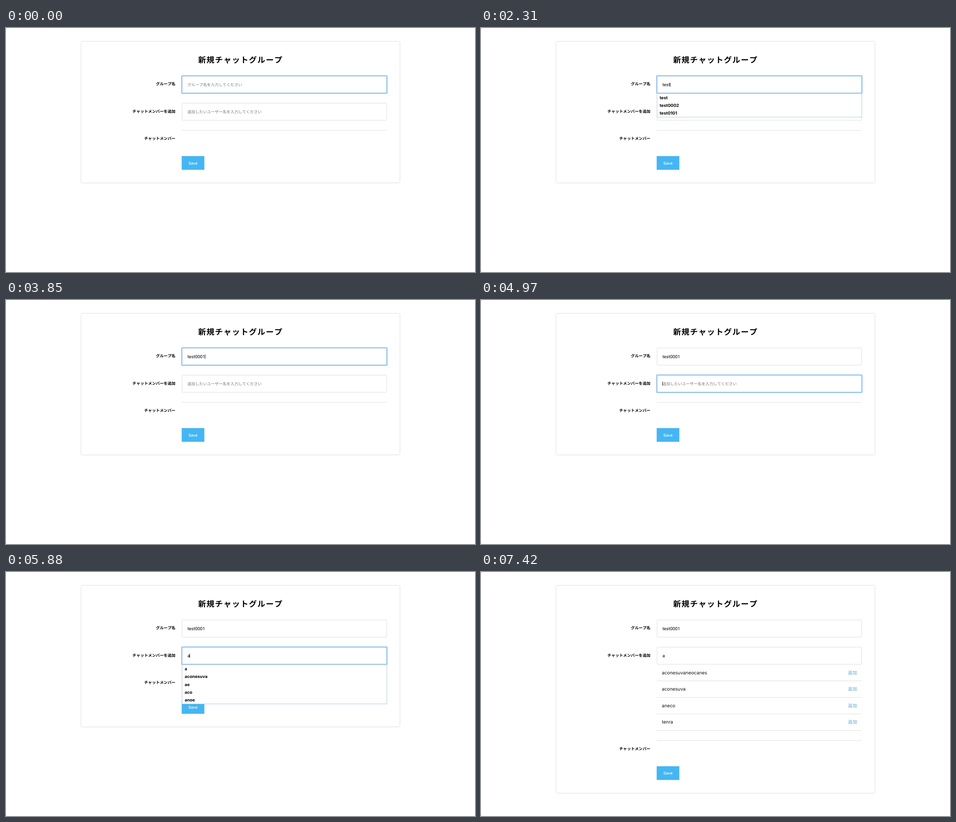
An HTML page that plays this animation: 1035 by 541 pixels, repeating every 8000 ms.

```html
<!DOCTYPE html>
<html lang="ja">
<head>
<meta charset="utf-8">
<title>新規チャットグループ</title>
<style>
  html, body { margin: 0; width: 100%; height: 100%; overflow: hidden; background: #fff; }
  svg { display: block; }
  text {
    font: 8.64px "Noto Sans CJK JP", "Noto Sans CJK", sans-serif;
    font-kerning: none;
    text-rendering: geometricPrecision;
    fill: #000;
  }
  .title { font-size: 17.28px; font-weight: 700; letter-spacing: 1.44px; }
  .label { font-weight: 700; text-anchor: end; }
  .hint { fill: #757575; }
  .typed { font: 9.9px Roboto, sans-serif; }
  .option { font: 700 9.45px Inter, sans-serif; }
  .user { font: 10.25px Inter, sans-serif; fill: #111; }
  .add { font-size: 10.08px; fill: #5fa5cb; }
  .save { font: 500 8.64px Inter, sans-serif; fill: #fff; }
  .box { fill: #fff; stroke: #dedede; }
  .rule { stroke: #dedede; }
  .glow { fill: none; stroke: #7dbcf2; stroke-opacity: .3; stroke-width: 3.6; }
  .ring { fill: none; stroke: #8abdec; stroke-width: 1.7; }
  .menu { fill: #fff; stroke: #b4cbd2; }
</style>
</head>
<body>
<svg id="stage" width="1035" height="541" viewBox="0 0 1035 541"></svg>
<script>
const LOOP = 8000;
const LEFT = 388, RIGHT = 840.5, TEXT_LEFT = 400.4;
const ROW = 17.28, LIST_ROW = 36.65, LIST_HEIGHT = 146.7;
const FIELD_TOPS = [106, 166.3];

const groups = ['test', 'test0002', 'test0101'];
const memberOptions = ['a', 'aconesuva', 'ae', 'aco', 'anoe'];
const users = ['aconesuvaneocanes', 'aconesuva', 'aneco', 'tenra'];

// Each step overrides part of the state from its time on.
const steps = [
  [0, { group: '', member: '', focus: 0, caret: false, options: [], open: false }],
  [70, { group: 't', caret: true, options: groups }],
  [140, { group: 'te' }],
  [630, { group: 'tes' }],
  [910, { group: 'test' }],
  [1470, { caret: false }],
  [1960, { caret: true }],
  [2520, { group: 'test0', options: groups.slice(1) }],
  [3080, { caret: false }],
  [3150, { group: 'test00', caret: true, options: groups.slice(1, 2) }],
  [3500, { group: 'test000' }],
  [3850, { group: 'test0001', options: [] }],
  [4410, { caret: false }],
  [4970, { focus: 1, caret: true }],
  [5530, { caret: false }],
  [5880, { member: 'a', caret: true, options: memberOptions }],
  [6020, { open: true }],
  [6370, { caret: false }],
  [6510, { focus: -1, options: [] }]
];

const stage = document.getElementById('stage');

function add(parent, tag, attrs, content = '') {
  const node = document.createElementNS('http://www.w3.org/2000/svg', tag);
  for (const key in attrs) node.setAttribute(key, attrs[key]);
  node.textContent = content;
  return parent.appendChild(node);
}
const rect = (parent, cls, x, y, width, height, rx = 0) =>
  add(parent, 'rect', { class: cls, x, y, width, height, rx });
const text = (parent, cls, x, y, content = '') =>
  add(parent, 'text', { class: cls, x, y }, content);
const rule = (parent, y) =>
  add(parent, 'line', { class: 'rule', x1: LEFT, x2: RIGHT, y1: y, y2: y });
const show = (node, on) => node.setAttribute('visibility', on ? 'visible' : 'hidden');

const card = rect(stage, 'box', 165.5, 29.5, 704, 314, 3);
text(stage, 'title', 423.9, 77.4, '新規チャットグループ');
text(stage, 'label', 374, 127.4, 'グループ名');
text(stage, 'label', 374, 187.6, 'チャットメンバーを追加');

const hints = ['グループ名を入力してください', '追加したいユーザー名を入力してください'];
const fields = FIELD_TOPS.map((top, i) => {
  rect(stage, 'box', 388.5, Math.floor(top) + .5, 451.5, 38, 1);
  const focus = add(stage, 'g', {});
  rect(focus, 'glow', 388, top, 452.7, 38.6, 1);
  rect(focus, 'ring', 388, top, 452.7, 38.6, 1);
  return {
    focus,
    hint: text(stage, 'hint', TEXT_LEFT, top + 22.8, hints[i]),
    typed: text(stage, 'typed', TEXT_LEFT, top + 22.9)
  };
});
const caret = add(stage, 'rect', { width: 1, height: 9, fill: '#222' });

const results = add(stage, 'g', {});
users.forEach((name, i) => {
  const y = 226.5 + i * LIST_ROW;
  text(results, 'user', 398.9, y, name);
  text(results, 'add', 809.8, y, '追加');
  rule(results, 241.5 + i * LIST_ROW);
});

const footer = add(stage, 'g', {});
rule(footer, 227);
text(footer, 'label', 374, 248, 'チャットメンバー');
add(footer, 'rect', { x: 387.7, y: 284, width: 50, height: 30.4, fill: '#44b6f3' });
text(footer, 'save', 402.5, 302.7, 'Save');

const menu = add(stage, 'g', {});

// Corners of the recorded window
for (const y of [0, 540]) add(stage, 'rect', { y, width: 1, height: 1, fill: '#777' });

function drawMenu({ focus, options }) {
  menu.replaceChildren();
  if (!options.length) return;
  const top = FIELD_TOPS[focus] + 39.3;
  rect(menu, 'menu', 388.5, top, 452, options.length * ROW + .5);
  options.forEach((name, i) => text(menu, 'option', 394.2, top + 12.5 + i * ROW, name));
}

function draw(state) {
  fields.forEach((field, i) => {
    const value = i ? state.member : state.group;
    field.typed.textContent = value;
    show(field.hint, !value);
    show(field.focus, state.focus === i);
  });
  show(caret, state.caret);
  if (state.caret) {
    const width = fields[state.focus].typed.getComputedTextLength();
    caret.setAttribute('x', Math.floor(TEXT_LEFT + width));
    caret.setAttribute('y', Math.round(FIELD_TOPS[state.focus] + 15));
  }
  const shift = state.open ? LIST_HEIGHT : 0;
  show(results, state.open);
  card.setAttribute('height', 314 + Math.round(shift));
  footer.setAttribute('transform', `translate(0 ${shift})`);
  drawMenu(state);
}

const start = performance.now();
let shown = -1;
function tick() {
  const time = (performance.now() - start) % LOOP;
  const count = steps.filter(([at]) => at <= time).length;
  if (count !== shown) {
    shown = count;
    draw(Object.assign({}, ...steps.slice(0, count).map(([, change]) => change)));
  }
  requestAnimationFrame(tick);
}
tick();
</script>
</body>
</html>
```
